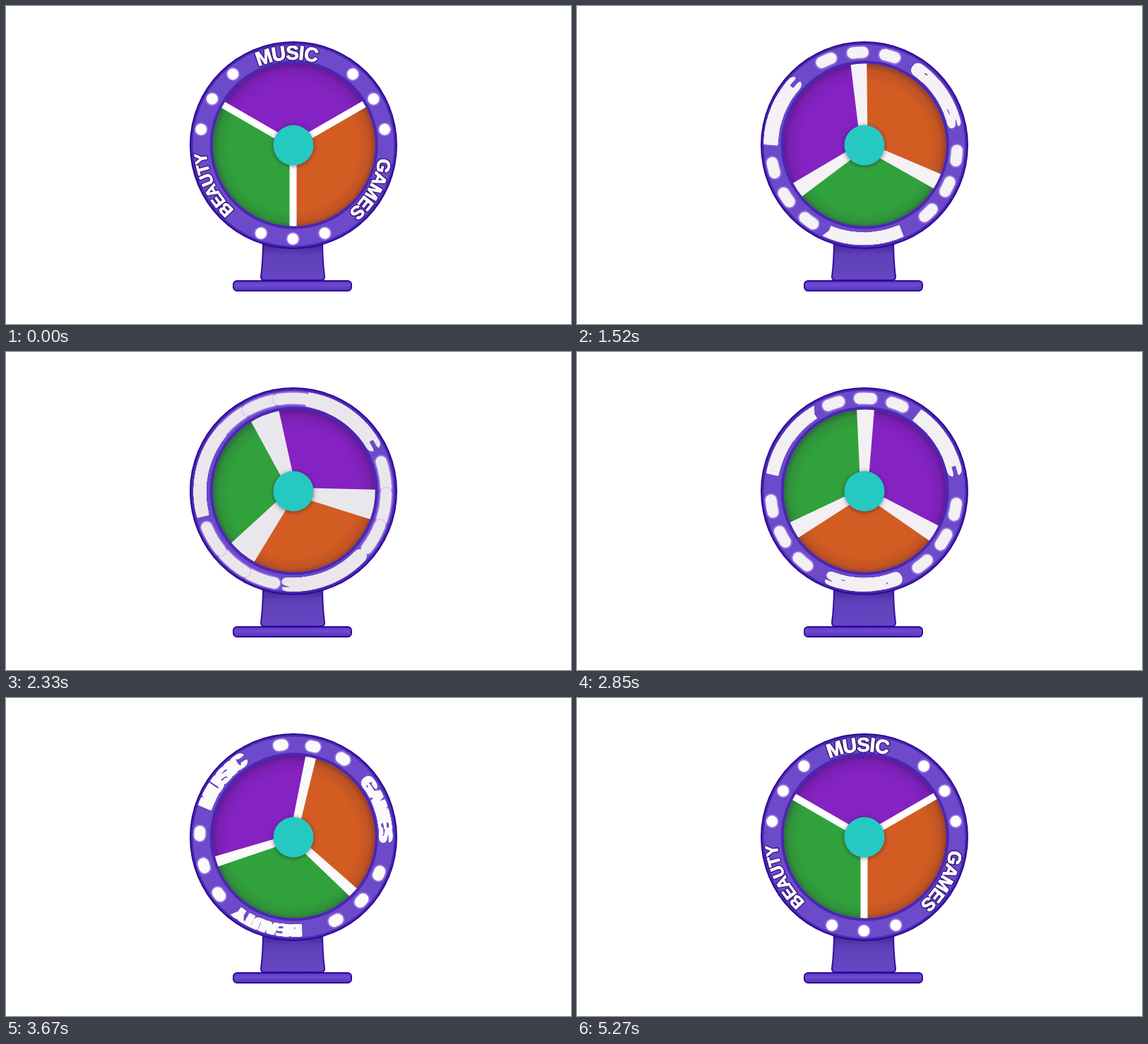
Recreate the animation shown at these times as an HTML page with a canvas. Size 800 by 450 pixels, loop 5730 ms.

```html
<!DOCTYPE html>
<html lang="en">
<head>
<meta charset="utf-8">
<title>Prize wheel</title>
<style>
html, body { margin: 0; width: 100%; height: 100%; overflow: hidden; background: #fff; }
canvas { display: block; width: 800px; height: 450px; }
</style>
</head>
<body>
<canvas id="stage" width="800" height="450"></canvas>
<script>
const ctx = document.getElementById('stage').getContext('2d');
const TAU = Math.PI * 2, RAD = Math.PI / 180;
const LOOP = 5730, FRAME = 100 / 3;
const CX = 407, CY = 197, DISC = 115, TRACK = 132;

// Wind up, spin, overshoot, settle: time (ms), angle (deg), speed (deg/s)
const KEYS = [
  [0, 0, 0], [680, 0, 0], [1060, -98, -120], [1880, 255, 1350], [2850, 1141, 440],
  [3670, 1392.5, 150], [4300, 1445, 35], [5270, 1440, 0], [LOOP, 1440, 0]
];
const WORDS = [['MUSIC', -3.7, 28], ['GAMES', 119, 26], ['BEAUTY', 244, 24]];
const SECTORS = ['#d25c22', '#31a23b', '#8422c2'];

// Angles are clockwise from twelve o'clock
const polar = deg => (deg - 90) * RAD;

function pose(time) {
  let i = 0;
  while (i < KEYS.length - 2 && time >= KEYS[i + 1][0]) i++;
  const [t0, a0, v0] = KEYS[i], [t1, a1, v1] = KEYS[i + 1];
  const span = t1 - t0, sec = span / 1000;
  const u = Math.floor((time - t0) / FRAME) * FRAME / span;
  const m0 = v0 * sec, m1 = v1 * sec, d = a1 - a0;
  const c2 = 3 * d - 2 * m0 - m1, c3 = m0 + m1 - 2 * d;
  return {
    angle: a0 + u * (m0 + u * (c2 + u * c3)),
    smear: Math.abs(m0 + u * (2 * c2 + 3 * u * c3)) / sec / 60
  };
}

function disc(r, fill) {
  ctx.beginPath();
  ctx.arc(0, 0, r, 0, TAU);
  ctx.fillStyle = fill;
  ctx.fill();
}

function linear(x0, y0, x1, y1, ...stops) {
  const g = ctx.createLinearGradient(x0, y0, x1, y1);
  stops.forEach(([at, color]) => g.addColorStop(at, color));
  return g;
}

function stand() {
  ctx.lineWidth = 2;
  ctx.strokeStyle = '#3210a0';
  ctx.beginPath();
  ctx.moveTo(364, 330);
  ctx.quadraticCurveTo(364, 360, 361, 383);
  ctx.quadraticCurveTo(361, 388, 366, 388);
  ctx.lineTo(446, 388);
  ctx.quadraticCurveTo(451, 388, 451, 383);
  ctx.quadraticCurveTo(448, 360, 448, 330);
  ctx.closePath();
  ctx.fillStyle = linear(0, 338, 0, 388, [0, '#472a9c'], [.3, '#6040ba'], [1, '#6846c4']);
  ctx.fill();
  ctx.stroke();

  ctx.beginPath();
  ctx.roundRect(322, 389, 167, 14, 5);
  ctx.fillStyle = linear(0, 389, 0, 403, [0, '#5a30c6'], [.4, '#6f4cce'], [1, '#5530b8']);
  ctx.fill();
  ctx.strokeStyle = '#2c0c98';
  ctx.stroke();
}

function spoke(deg, smear, half, color) {
  ctx.beginPath();
  for (const [side, r] of [[-1, 0], [-1, 124], [1, 124], [1, 0]]) {
    const a = polar(deg + side * smear / 2);
    ctx.lineTo(r * Math.cos(a) - side * half * Math.sin(a), r * Math.sin(a) + side * half * Math.cos(a));
  }
  ctx.fillStyle = color;
  ctx.fill();
}

function face(angle, smear, white) {
  ctx.save();
  ctx.translate(.7, -.5);
  disc(DISC + 4, '#4a26b4');
  ctx.beginPath();
  ctx.arc(0, 0, DISC, 0, TAU);
  ctx.clip();
  SECTORS.forEach((color, i) => {
    const start = angle + 60 + i * 120;
    ctx.beginPath();
    ctx.moveTo(0, 0);
    ctx.arc(0, 0, DISC + 1, polar(start), polar(start + 120.3));
    ctx.fillStyle = color;
    ctx.fill();
  });
  const shade = ctx.createRadialGradient(0, 3, 92, 0, 1, 118);
  shade.addColorStop(0, 'rgba(35,10,50,0)');
  shade.addColorStop(.6, 'rgba(35,10,50,.1)');
  shade.addColorStop(1, 'rgba(35,10,60,.42)');
  disc(DISC, shade);
  ctx.translate(-1.2, .5);
  for (let i = 0; i < 3; i++) spoke(angle + 60 + i * 120, smear, 5, white);
  ctx.restore();
}

function lamps(angle, smear, white) {
  ctx.lineCap = 'round';
  for (let i = 0; i < 9; i++) {
    const a = angle + 60 + Math.floor(i / 3) * 120 + (i % 3 - 1) * 20;
    ctx.beginPath();
    ctx.arc(0, 0, TRACK, polar(a - smear / 2 - .02), polar(a + smear / 2 + .02));
    ctx.lineWidth = 20;
    ctx.strokeStyle = 'rgba(205,160,255,.4)';
    ctx.stroke();
    ctx.lineWidth = 16;
    ctx.strokeStyle = white;
    ctx.stroke();
  }
  ctx.lineCap = 'butt';
}

function word([text, center, size], angle, paint) {
  ctx.font = `bold ${size}px "Liberation Sans", Arial, sans-serif`;
  const width = s => ctx.measureText(s).width;
  const half = width(text) / 2;
  [...text].forEach((c, i) => {
    // Prefix widths keep the kerning of the whole word
    const mid = width(text.slice(0, i + 1)) - width(c) / 2 - half;
    ctx.save();
    ctx.rotate((angle + center) * RAD + mid / TRACK);
    paint(c, size * .36 - TRACK);
    ctx.restore();
  });
}

function labels(angle, smear, white) {
  ctx.textAlign = 'center';
  ctx.lineJoin = 'round';
  const outline = Math.max(0, 1 - smear);
  if (outline > 0) {
    ctx.lineWidth = 3.6;
    ctx.strokeStyle = `rgba(45,15,115,${outline * .85})`;
    WORDS.forEach(w => word(w, angle, (c, y) => ctx.strokeText(c, 0, y)));
  }
  const copies = Math.ceil(smear / .8);
  ctx.fillStyle = ctx.strokeStyle = white;
  ctx.lineWidth = .9;
  for (let i = 0; i <= copies; i++) {
    const shift = copies ? (i / copies - .5) * smear : 0;
    WORDS.forEach(w => word(w, angle + shift, (c, y) => {
      ctx.fillText(c, 0, y);
      ctx.strokeText(c, 0, y);
    }));
  }
}

function hub() {
  ctx.save();
  ctx.shadowColor = 'rgba(20,0,40,.5)';
  ctx.shadowBlur = 6;
  ctx.shadowOffsetY = 1;
  disc(28.5, '#25c9c2');
  ctx.restore();
}

function draw(time) {
  const { angle, smear } = pose(time);
  const dim = Math.min(1, smear / 12);
  const white = `rgb(${255 - 21 * dim},${255 - 24 * dim},${255 - 19 * dim})`;
  ctx.fillStyle = '#fff';
  ctx.fillRect(0, 0, 800, 450);
  stand();
  ctx.save();
  ctx.translate(CX, CY);
  disc(147, '#2c0a96');
  disc(145, '#4c28b2');
  disc(142.5, '#6c4aca');
  ctx.save();
  ctx.translate(-.8, .5);
  lamps(angle, smear, white);
  labels(angle, smear, white);
  ctx.restore();
  face(angle, smear, white);
  hub();
  ctx.restore();
}

const start = performance.now();
function tick() {
  draw((performance.now() - start) % LOOP);
  requestAnimationFrame(tick);
}
tick();
</script>
</body>
</html>
```
